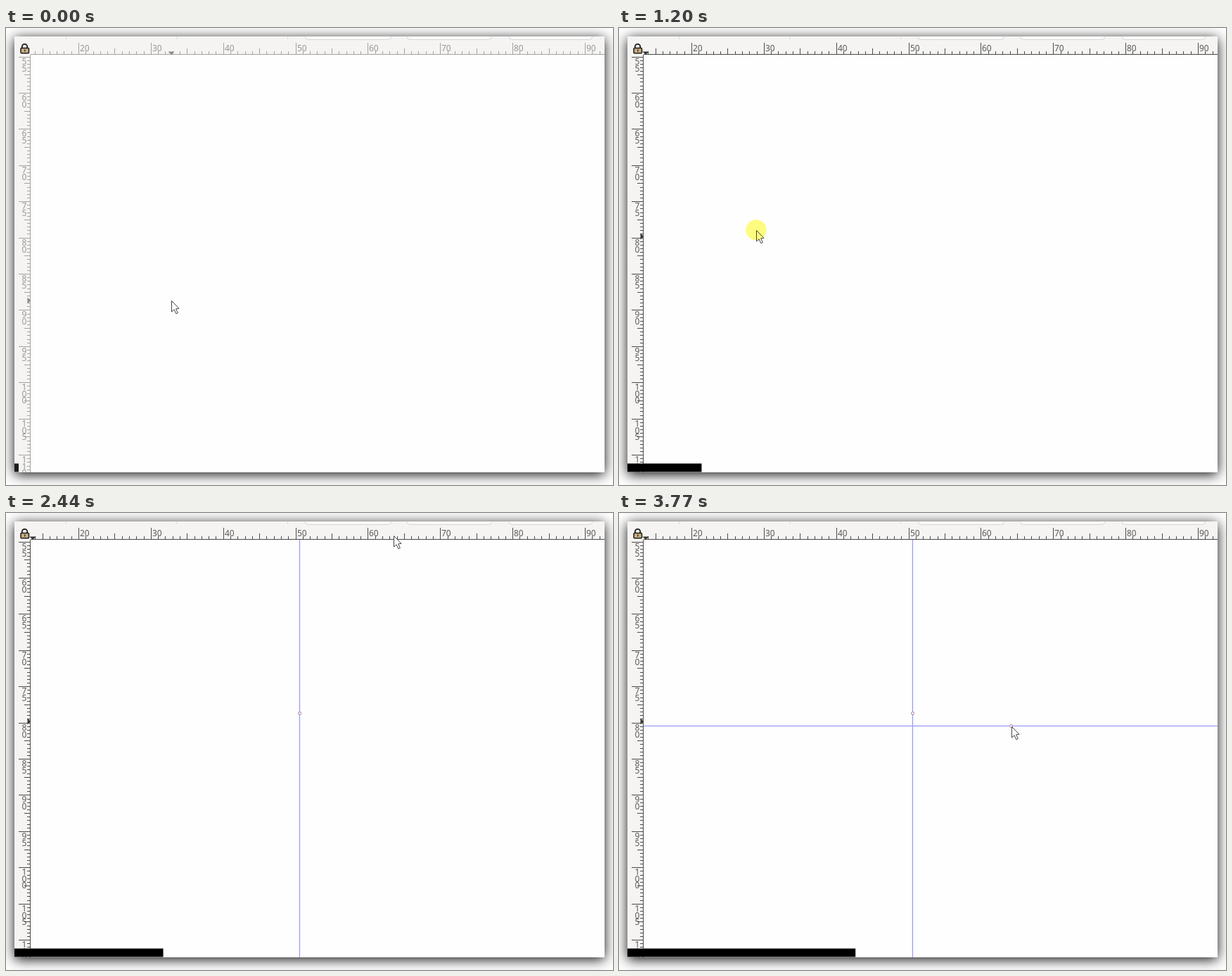
Write an HTML page with a canvas that moves like this. It is 863 px wide and 649 px high and loops after 3850 ms.

```html
<!DOCTYPE html>
<html lang="en">
<head>
<meta charset="utf-8">
<title>Dragging guides from the rulers</title>
<style>
html, body { margin: 0; width: 100%; height: 100%; overflow: hidden; background: #fff; }
canvas { display: block; }
</style>
</head>
<body>
<canvas id="stage" width="863" height="649"></canvas>
<script>
const ctx = document.getElementById('stage').getContext('2d');
const LOOP = 3850, STEPS = 49;
const LEFT = 12, TOP = 12, RIGHT = 851, BOTTOM = 631; // window
const PAGE_X = 35, PAGE_Y = 38;                       // drawing area
const UNIT = 10.285;                                  // pixels per ruler unit
const ARROW = new Path2D('M0 0V15.5L3.6 12.3L6.3 18.2L8.8 17.1L6.2 11.3L10.5 10.8Z');

// Where the pointer rests or turns; the motion between is smoothed.
const STOPS = [
  { step: 0, x: 235, y: 387 },
  { step: 7, x: 27, y: 300 },
  { step: 12, x: 27, y: 300 },
  { step: 15, x: 195, y: 287 },
  { step: 20, x: 417, y: 284 },  // first guide dropped
  { step: 23, x: 417, y: 284 },
  { step: 26, x: 488, y: 160 },
  { step: 29, x: 551, y: 32 },
  { step: 36, x: 551, y: 33 },   // second guide picked up
  { step: 41, x: 558, y: 279 },
  { step: 44, x: 558, y: 303 },
  { step: STEPS, x: 558, y: 303 }
];

function slope(i, axis) {
  const a = STOPS[i], b = STOPS[i + 1];
  return a && b ? (b[axis] - a[axis]) / (b.step - a.step) : 0;
}

// Monotone cubic: no overshoot, zero speed at every rest.
function tangent(i, axis) {
  const before = slope(i - 1, axis), after = slope(i, axis);
  return before * after > 0 ? 2 * before * after / (before + after) : 0;
}

function pointerAt(step) {
  const i = Math.max(0, STOPS.findIndex(stop => stop.step >= step) - 1);
  const a = STOPS[i], b = STOPS[i + 1];
  const span = b.step - a.step, k = (step - a.step) / span;
  const along = axis => a[axis]
    + (b[axis] - a[axis]) * k * k * (3 - 2 * k)
    + span * k * (1 - k) * (tangent(i, axis) * (1 - k) - tangent(i + 1, axis) * k);
  return { x: along('x'), y: along('y') };
}

function rect(x, y, w, h, color) {
  ctx.fillStyle = color;
  ctx.fillRect(x, y, w, h);
}

function paint(fill, stroke, width = 1) {
  ctx.fillStyle = fill;
  ctx.fill();
  if (!stroke) return;
  ctx.strokeStyle = stroke;
  ctx.lineWidth = width;
  ctx.stroke();
}

function disc(x, y, r) {
  ctx.beginPath();
  ctx.arc(x, y, r, 0, Math.PI * 2);
}

function clipTo(x, y, w, h) {
  ctx.save();
  ctx.beginPath();
  ctx.rect(x, y, w, h);
  ctx.clip();
}

function drawWindow() {
  rect(0, 0, 863, 649, '#fff');
  ctx.save();
  ctx.shadowColor = 'rgba(0,0,0,.95)';
  ctx.shadowBlur = 17;
  ctx.shadowOffsetY = 3;
  rect(LEFT, TOP, RIGHT - LEFT, BOTTOM - TOP, '#f5f4f2');
  ctx.restore();
  rect(PAGE_X, PAGE_Y, RIGHT - PAGE_X, BOTTOM - PAGE_Y, '#fefefe');

  // lower edge of the toolbar
  clipTo(LEFT, TOP, RIGHT - LEFT, 6);
  for (let i = 0; i < 3; i++) {
    ctx.beginPath();
    ctx.roundRect(425.5 + i * 145, 0.5, 122 - i * 2, 16, 4);
    paint('#fbfaf9', '#d8d5d2');
    rect(85 + i * 157.5, TOP, 1, 4, '#dedbd8');
  }
  ctx.restore();
}

function drawLock() {
  ctx.beginPath();
  ctx.arc(26.5, 26.5, 3.7, Math.PI, 0);
  ctx.lineTo(30.2, 29);
  ctx.lineTo(22.8, 29);
  ctx.closePath();
  paint('#f5f4f2', '#1c1a17', 1.8);
  ctx.beginPath();
  ctx.roundRect(21, 28.5, 11.5, 7.2, 1);
  paint('#c6ae83', '#1c1a17', 1.5);
  rect(26, 30.5, 1.5, 3, '#3a3226');
}

const tickLength = n => n % 10 === 0 ? 17 : n % 5 === 0 ? 9 : 5;

function drawMarker(x, y, angle, color) {
  ctx.save();
  ctx.translate(x, y);
  ctx.rotate(angle);
  ctx.beginPath();
  ctx.moveTo(0, 0);
  ctx.lineTo(-4.5, -4.5);
  ctx.lineTo(4.5, -4.5);
  paint(color);
  ctx.restore();
}

function drawRulers(active, markX, markY) {
  const ink = active ? '#4a4a4a' : '#a3a3a3';
  const text = active ? '#5a5a5a' : '#989898';
  clipTo(LEFT, TOP, RIGHT - LEFT, BOTTOM - TOP);
  ctx.font = '12px "Noto Sans", sans-serif';

  ctx.textAlign = 'left';
  for (let n = 14; n <= 92; n++) {
    const x = Math.round(103 + (n - 20) * UNIT);
    rect(x, PAGE_Y - tickLength(n), 1, tickLength(n), ink);
    ctx.fillStyle = text;
    if (n % 10 === 0) ctx.fillText(n, x + 2, 33);
  }

  // the vertical ruler counts half units, with its digits stacked
  ctx.textAlign = 'center';
  for (let h = 0; h <= 116; h++) {
    const y = Math.round(40.5 + h * UNIT / 2);
    rect(PAGE_X - tickLength(h), y, tickLength(h), 1, ink);
    if (h % 10) continue;
    ctx.fillStyle = text;
    [...String(55 + h / 2)].forEach((digit, i) => ctx.fillText(digit, 26, y + 11 + i * 9.7));
  }
  rect(PAGE_X, PAGE_Y - 1, RIGHT - PAGE_X, 1, ink);
  rect(PAGE_X - 1, PAGE_Y, 1, BOTTOM - PAGE_Y, ink);

  const mark = active ? '#333' : '#888';
  drawMarker(markX, PAGE_Y, 0, mark);
  drawMarker(PAGE_X, markY, -Math.PI / 2, mark);
  ctx.restore();
}

function drawGuide({ x, y }, vertical, dragged) {
  const color = dragged ? '#ff9f9f' : '#9c9cfa';
  const cx = Math.round(x), cy = Math.round(y);
  if (vertical) rect(cx - 0.2, PAGE_Y, 1.3, BOTTOM - PAGE_Y, color);
  else rect(PAGE_X, cy - 0.2, RIGHT - PAGE_X, 1.3, color);
  disc(cx + 0.5, cy + 0.5, 2);
  paint('#fefefe', dragged ? '#e59a80' : '#a07f9c');
}

function drawPointer({ x, y }, pressed) {
  ctx.save();
  ctx.translate(x + 0.5, y + 0.5);
  ctx.fillStyle = '#fff';
  ctx.fill(ARROW);
  ctx.strokeStyle = '#44444a';
  ctx.lineWidth = 1;
  ctx.stroke(ARROW);
  if (pressed) {
    ctx.globalCompositeOperation = 'multiply';
    disc(-0.5, -0.8, 14.5);
    paint('#fefd80');
  }
  ctx.restore();
}

function draw(t) {
  const step = Math.min(STEPS - 1, Math.floor(t / LOOP * STEPS + 0.15));
  const pointer = pointerAt(step);
  const firstDrag = step >= 10 && step < 22;
  const secondDrag = step >= 32 && step < 46;

  drawWindow();
  drawRulers(step >= 15, step < 7 ? Math.max(PAGE_X + 3, pointer.x) : PAGE_X + 3,
    step < 13 ? pointer.y : 296);
  drawLock();
  // a dragged guide trails the pointer a little
  if (step >= 16) drawGuide(pointerAt(Math.min(step - 0.3, 22)), true, firstDrag);
  if (step >= 37) {
    const { x, y } = pointerAt(step - 0.3);
    drawGuide({ x: x - 0.6, y: y - 0.6 }, false, secondDrag);
  }
  rect(LEFT, 618.5, 6 + step * 6.63, 12, step ? '#000' : '#1c1c1c');
  drawPointer(pointer, firstDrag || secondDrag);
}

function tick() {
  draw(performance.now() % LOOP);
  requestAnimationFrame(tick);
}
tick();
</script>
</body>
</html>
```
